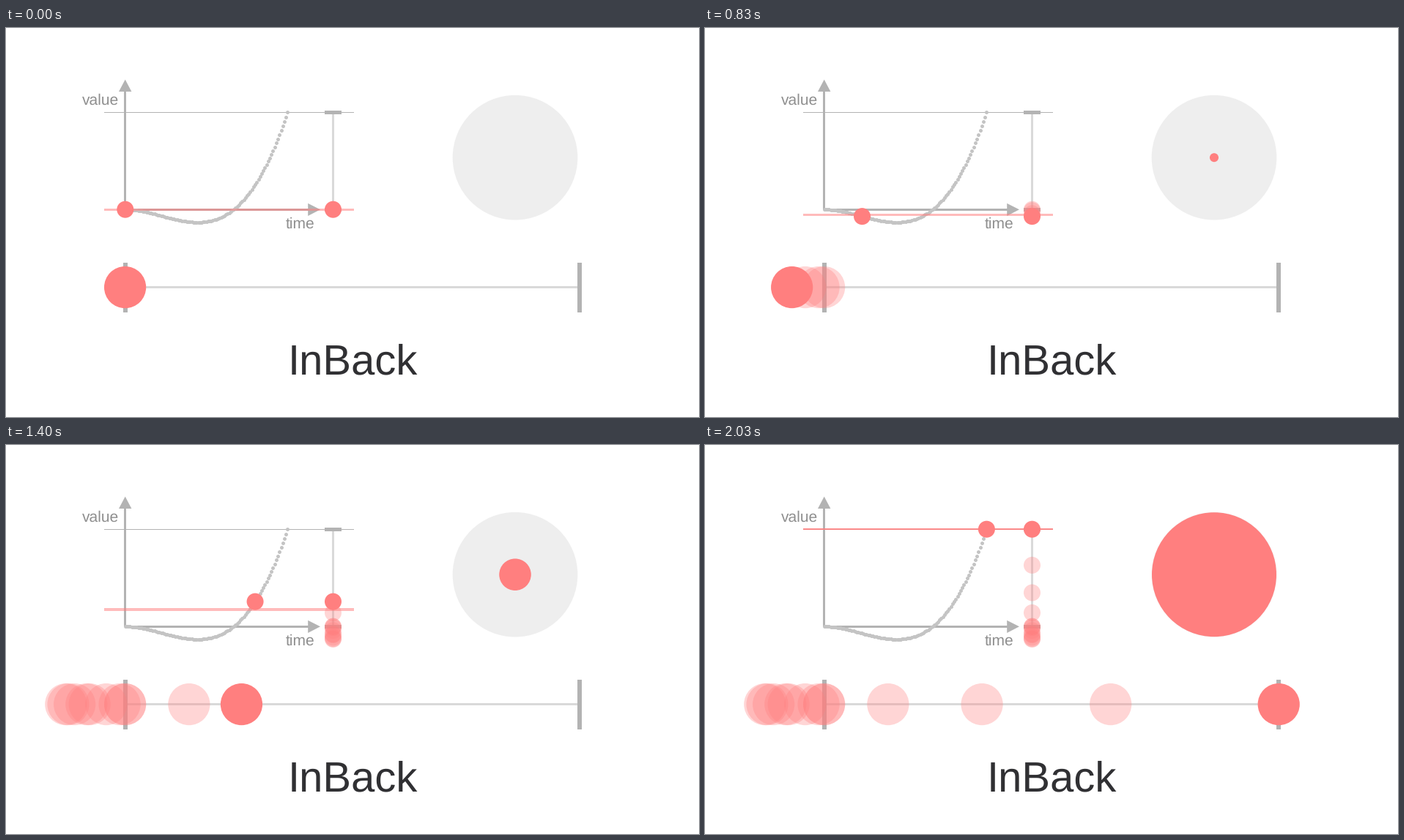
Recreate the animation shown at these times as a matplotlib script. Size 946 px wide and 532 px high, loop 2.91 s.

```python
import matplotlib.pyplot as plt
import numpy as np
from matplotlib.animation import FuncAnimation
from matplotlib.patches import Circle, Polygon, Rectangle

W, H, DPI = 946, 532, 64
PT = 72 / DPI  # points per pixel

RED = "#ff7f7f"
GREY = "#b3b3b3"
TRACK = "#d9d9d9"
CURVE = "#c4c4c4"
DISC = "#eeeeee"
LABEL = "#8f8f8f"
TITLE = "#303033"

X0, X1 = 162.8, 384.4      # graph, time axis
Y0, Y1 = 248.2, 115.2      # graph, value axis
POST_X = 446.5
SLIDE_X0, SLIDE_X1, SLIDE_Y = 162.6, 783.2, 354.6
DISC_XY, DISC_R = (695, 177.2), 85
SMALL_R, BIG_R = 11.5, 28.6
FPS, START, GHOSTS = 30, 18, 12

plt.rcParams["text.hinting"] = "none"
fig = plt.figure(figsize=(W / DPI, H / DPI), dpi=DPI, facecolor="white")
ax = fig.add_axes([0, 0, 1, 1])
ax.set(xlim=(0, W), ylim=(H, 0))
ax.axis("off")


def ease(t):
    return t * t * (3 * t - 2)


def graph_y(v):
    return Y0 + (Y1 - Y0) * v


def slide_x(v):
    return SLIDE_X0 + (SLIDE_X1 - SLIDE_X0) * v


def box(left, top, right, bottom, color, z=1, alpha=1):
    return ax.add_patch(Rectangle((left, top), right - left, bottom - top,
                                  color=color, lw=0, zorder=z, alpha=alpha))


def disc(x, y, r, color=RED, z=7, alpha=1):
    return ax.add_patch(Circle((x, y), r, color=color, lw=0, zorder=z, alpha=alpha))


def arrow(*points):
    ax.add_patch(Polygon(points, color=GREY, lw=0, zorder=2))


def label(x, y, text, size, color):
    ax.text(x, y, text, family="Liberation Sans", fontsize=size * PT,
            color=color, va="baseline", ha="left", zorder=3)


# Graph: axes, limit line, value post
box(134, 115, 475, 116, GREY)
box(445, 115, 448, 248, TRACK)
box(435, 113, 458, 118, GREY, 2)
box(435, 246, 458, 251, GREY, 2)
box(161, 82, 164, 249, GREY, 2)
box(162, 247, 414, 250, GREY, 2)
arrow((162.7, 70.5), (154, 87), (171.4, 87))
arrow((429, 248.3), (412.2, 239.8), (412.2, 257))

times = np.linspace(0, 1, 101)
ax.plot(X0 + (X1 - X0) * times, graph_y(ease(times)), "o", color=CURVE,
        ms=5 * PT, mew=0, zorder=3)

# Slider track and the scaled disc
box(163, 353, 783, 356, TRACK)
for x in (160, 780):
    box(x, 321, x + 6, 389, GREY, 2)
disc(*DISC_XY, DISC_R + 0.3, DISC, 1)

label(103.5, 105, "value", 21, LABEL)
label(381.5, 273.5, "time", 21, LABEL)
label(384.3, 473, "InBack", 58, TITLE)

# Moving parts
level = box(134, 247, 475, 250, RED, 4)
dot = disc(X0, Y0, SMALL_R)
post_dot = disc(POST_X, Y0, SMALL_R)
ball = disc(SLIDE_X0, SLIDE_Y, BIG_R)
grow = disc(*DISC_XY, 0, z=5)
ghosts = []
for k in range(GHOSTS):
    v = ease(k / GHOSTS)
    ghosts.append((disc(POST_X, graph_y(v), SMALL_R, z=5, alpha=0.32),
                   disc(slide_x(v), SLIDE_Y, BIG_R, z=5, alpha=0.32)))


def progress(step):
    return min(max((step - START) / FPS, 0), 1)


def set_level(step):
    # The level line trails the dots by one step
    t = progress(step - 1)
    v = ease(t)
    if t == 1:
        height, alpha = 2, 0.88
    else:
        height, alpha = (4 if v > 0.1 else 3), 0.53
    level.set_y(round(graph_y(v) + 0.3 - height / 2))
    level.set_height(height)
    level.set_alpha(alpha)


def update(i):
    step = (30 * i + 15) // 100  # 10 ms ticks to 30 fps steps
    t = progress(step)
    v = ease(t)
    dot.center = X0 + (X1 - X0) * t, graph_y(v)
    post_dot.center = POST_X, graph_y(v)
    ball.center = slide_x(v), SLIDE_Y
    grow.set_radius(DISC_R * abs(v))
    grow.set_visible(abs(v) > 0.005)
    set_level(step)
    for k, pair in enumerate(ghosts):
        shown = (step - START - 1) * GHOSTS > k * FPS
        for ghost in pair:
            ghost.set_visible(shown)
    return []


anim = FuncAnimation(fig, update, frames=291, interval=10, repeat=True,
                     repeat_delay=0, blit=False)
plt.show()
```
